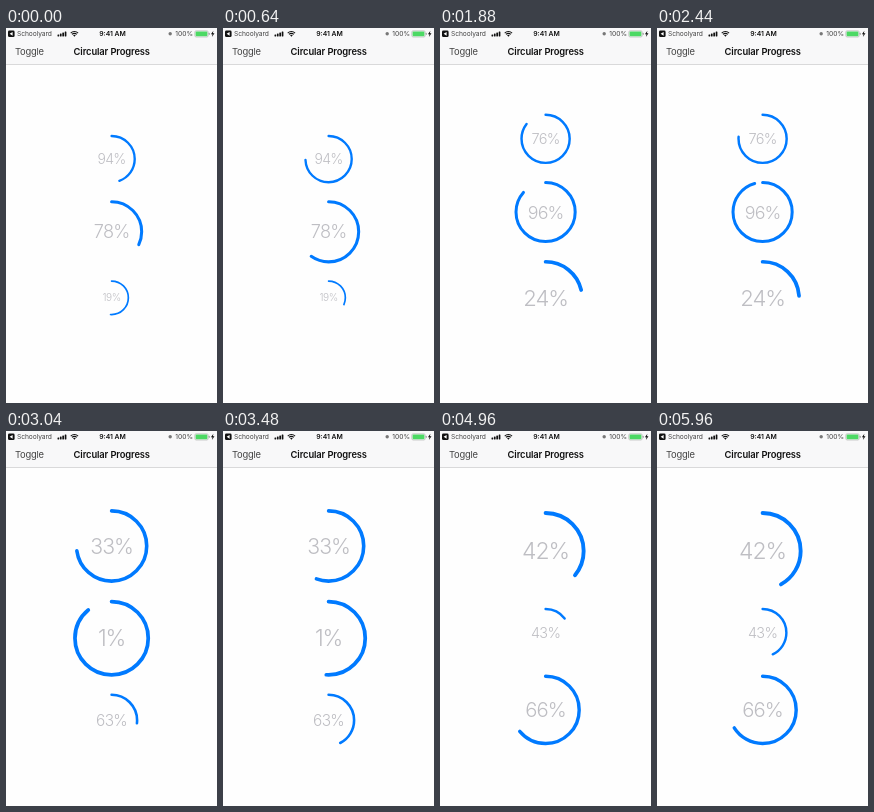
These frames come from a looping animation (211 by 375 pixels, 6 s). An HTML page with a canvas:

```html
<!DOCTYPE html>
<html lang="en">
<head>
<meta charset="utf-8">
<title>Circular Progress</title>
<style>
html, body { margin: 0; width: 100%; height: 100%; overflow: hidden; background: #fff; }
canvas { display: block; width: 211px; height: 375px; }
</style>
</head>
<body>
<canvas id="stage"></canvas>
<script>
const W = 211, H = 375, LOOP = 6000;
const CENTER_X = 105.6, STACK_Y = 197.1, GAP = 16.8;
const BLUE = '#007aff', INK = '#111', GRAY = '#bebec3';
const FONT = 'Inter, "Open Sans", sans-serif';

const canvas = document.getElementById('stage');
const ctx = canvas.getContext('2d');
const dpr = window.devicePixelRatio || 1;
canvas.width = W * dpr;
canvas.height = H * dpr;

// Each toggle gives the three rings new sizes and new percentages.
const toggles = [
  { start: 0, length: 1060, radii: [24.3, 31.6, 17.6], from: [44.5, 32, 51], to: [94, 78, 19] },
  { start: 1360, length: 1100, radii: [25.3, 31.1, 38.4], from: [94, 78, 19], to: [76, 96, 24] },
  { start: 2960, length: 1100, radii: [36.9, 38.5, 26.8], from: [76, 96, 24], to: [33, 1, 63] },
  { start: 4600, length: 1100, radii: [40, 25, 35.3], from: [33, 1, 63], to: [42, 43, 66] }
];

function text(str, x, y, size, { weight = 400, color = INK, align = 'left', spacing = 0 } = {}) {
  ctx.font = `${weight} ${size}px ${FONT}`;
  ctx.letterSpacing = `${spacing}px`;
  ctx.textAlign = align;
  ctx.fillStyle = color;
  ctx.fillText(str, x, y);
}

function box(x, y, w, h, r, color) {
  ctx.fillStyle = color;
  ctx.beginPath();
  ctx.roundRect(x, y, w, h, r);
  ctx.fill();
}

function shape(points, color) {
  ctx.fillStyle = color;
  ctx.beginPath();
  points.forEach(([x, y]) => ctx.lineTo(x, y));
  ctx.fill();
}

function drawWifi(x, y) {
  ctx.strokeStyle = INK;
  ctx.lineCap = 'butt';
  ctx.lineWidth = 1.1;
  for (const r of [5.2, 3.3]) {
    ctx.beginPath();
    ctx.arc(x, y, r, -Math.PI * 0.75, -Math.PI * 0.25);
    ctx.stroke();
  }
  ctx.fillStyle = INK;
  ctx.beginPath();
  ctx.moveTo(x, y);
  ctx.arc(x, y, 1.9, -Math.PI * 0.75, -Math.PI * 0.25);
  ctx.fill();
}

function drawStatusBar() {
  box(2, 2.5, 6.6, 6.6, 1.4, INK);
  shape([[3.6, 5.8], [6.6, 3.9], [6.6, 7.7]], '#fff');
  text('Schoolyard', 11, 8.3, 6.7, { color: '#444', spacing: -0.1 });
  for (let i = 0; i < 4; i++) box(51.5 + i * 2.4, 6.5 - i, 1.7, 2 + i, 0.4, INK);
  drawWifi(68.4, 8.7);
  text('9:41 AM', 106.5, 8.3, 6.8, { weight: 600, align: 'center' });

  box(162.5, 4, 3.4, 3.4, 1.7, '#777');
  text('100%', 187, 8.3, 6.7, { color: '#444', align: 'right' });
  ctx.strokeStyle = '#999';
  ctx.lineWidth = 0.5;
  ctx.beginPath();
  ctx.roundRect(188.8, 2.8, 13.4, 6.2, 1.4);
  ctx.stroke();
  box(189.6, 3.6, 11.8, 4.6, 0.8, '#4cd964');
  box(202.8, 4.8, 0.9, 2.2, 0.4, '#999');
  shape([[207.4, 2.8], [204.9, 6.3], [206.5, 6.3], [205.9, 9], [208.5, 5.3], [206.9, 5.3]], INK);
}

function drawHeader() {
  box(0, 0, W, 36, 0, '#f8f8f9');
  box(0, 36, W, 0.6, 0, '#b5b5b8');
  drawStatusBar();
  text('Toggle', 9, 27, 9.4, { color: '#444', spacing: -0.25 });
  text('Circular Progress', 105.7, 27, 9.4, { weight: 600, align: 'center', spacing: -0.13 });
}

function drawRing(y, radius, percent, label) {
  const line = radius * 0.097;
  ctx.strokeStyle = BLUE;
  ctx.lineWidth = line;
  ctx.lineCap = 'round';
  ctx.beginPath();
  ctx.arc(CENTER_X, y, radius - line / 2, -Math.PI / 2, (percent / 50 - 0.5) * Math.PI);
  ctx.stroke();

  const size = radius * 0.575;
  text(`${label}%`, CENTER_X, y + size * 0.365, size,
    { weight: 300, color: GRAY, align: 'center', spacing: -size * 0.045 });
}

function draw(time) {
  ctx.setTransform(dpr, 0, 0, dpr, 0, 0);
  box(0, 0, W, H, 0, '#fefefe');
  drawHeader();

  const { start, length, radii, from, to } = toggles.findLast(t => time >= t.start);
  const progress = Math.min(1, (time - start) / length);
  let y = STACK_Y - GAP - radii.reduce((sum, r) => sum + r, 0);
  radii.forEach((radius, i) => {
    drawRing(y + radius, radius, from[i] + (to[i] - from[i]) * progress, to[i]);
    y += radius * 2 + GAP;
  });
}

function tick() {
  draw(performance.now() % LOOP);
  requestAnimationFrame(tick);
}
tick();
</script>
</body>
</html>
```
